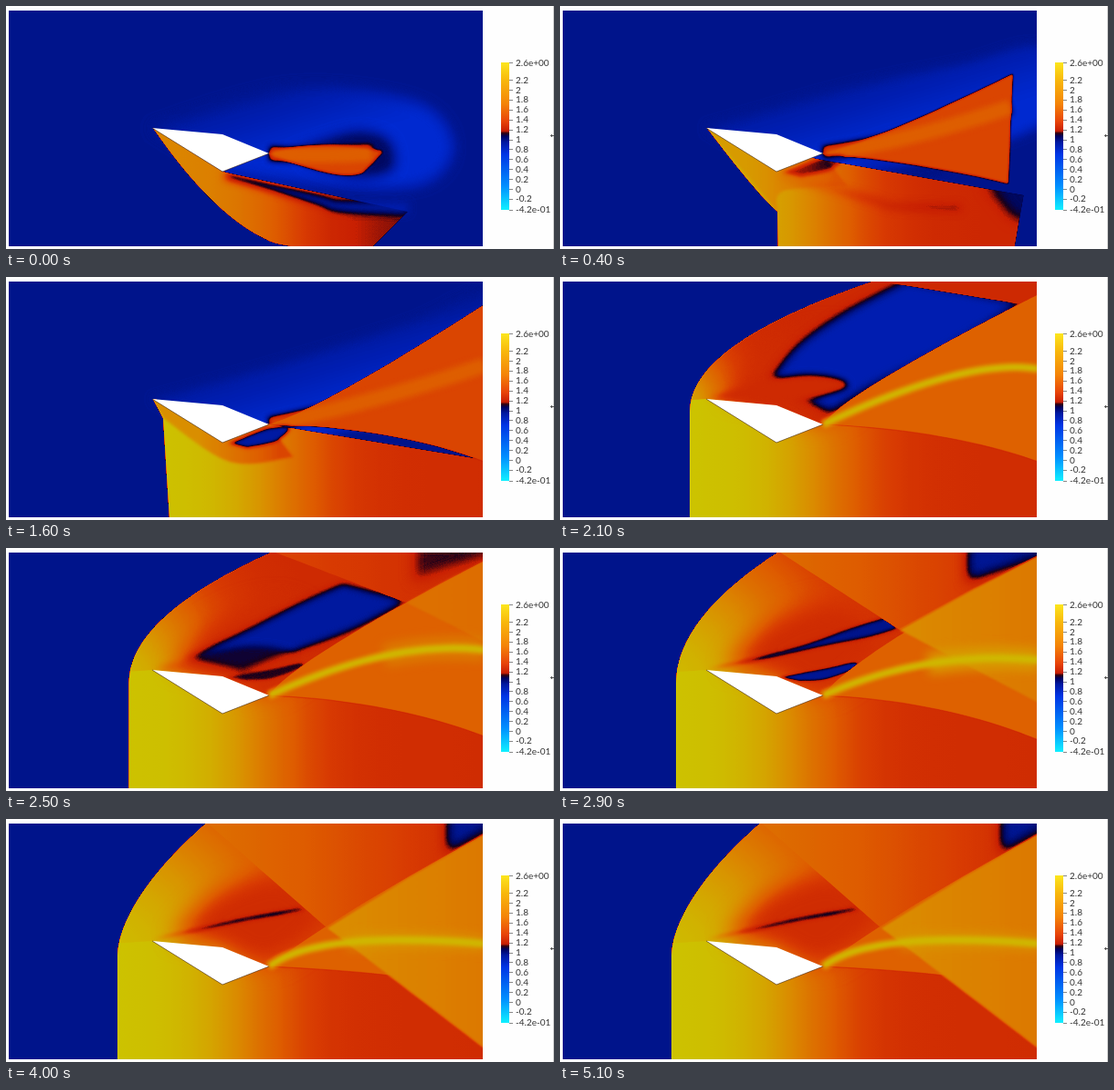
An HTML page with a canvas for the animation above (5200 ms loop, 600 px wide and 267 px high).

```html
<!DOCTYPE html>
<html lang="en">
<head>
<meta charset="utf-8">
<title>Supersonic flow around a wedge</title>
<style>
  html, body { margin: 0; width: 100%; height: 100%; overflow: hidden; background: #fefefe; }
  canvas { display: block; }
</style>
</head>
<body>
<canvas id="stage" width="600" height="267"></canvas>
<script>
const stage = document.getElementById('stage').getContext('2d');
const fieldCanvas = document.createElement('canvas');
fieldCanvas.width = 600;
fieldCanvas.height = 267;
const field = fieldCanvas.getContext('2d', { willReadFrequently: true });

const LOOP = 5200, STEP = 100;
const DOMAIN = [3, 5, 519, 259], RIGHT = 524;
const NOSE = [160, 134], ROOF = [237, 141], TAIL = [288, 162], KEEL = [237, 182];

// Key poses of the flow.
// bow: stem x, bend y, width and height of the part above the bend, its power, foot x
// roof, floor, jet: control and end point of the curves that leave the tail
// cross: where the reflected shock meets the roof, and its height at the outlet
// heat, glow: how far the hot gas reaches below and above the wedge
const POCKET = [232, 112, 262, 75, 312, 40, 380, 4], POCKET_BACK = [505, 28, 425, 78, 345, 118, 296, 148];
const POSES = [
  { t: 0, bow: [322, 266, -161, 132, .56, 322], roof: [340, 146, 412, 160], floor: [365, 194, 390, 183],
    jet: [340, 166, 400, 162], cross: [505, 30, 36], heat: 300, glow: 60, pocket: POCKET, pocketBack: POCKET_BACK },
  { t: 800, bow: [210, 212, -49, 78, 1, 211], roof: [345, 150, RIGHT, 46], floor: [425, 168, RIGHT, 199],
    jet: [400, 142, RIGHT, 94], cross: [505, 30, 36], heat: 290, glow: 60, pocket: POCKET, pocketBack: POCKET_BACK },
  { t: 1600, bow: [172, 155, -11, 21, 1, 179], roof: [345, 145, RIGHT, 30], floor: [425, 165, RIGHT, 203],
    jet: [400, 139, RIGHT, 97], cross: [505, 30, 36], heat: 300, glow: 60, pocket: POCKET, pocketBack: POCKET_BACK },
  { t: 2100, bow: [142, 150, 203, 146, 2.1, 142], roof: [310, 128, RIGHT, 19], floor: [425, 168, RIGHT, 203],
    jet: [445, 88, RIGHT, 101], cross: [505, 30, 36], heat: 290, glow: 60, pocket: POCKET, pocketBack: POCKET_BACK },
  { t: 2900, bow: [127, 150, 113, 146, 2, 127], roof: [320, 118, RIGHT, 9], floor: [420, 168, RIGHT, 211],
    jet: [400, 112, RIGHT, 123], cross: [372, 90, 170], heat: 265, glow: 130,
    pocket: [162, 133, 260, 109, 320, 88, 358, 76], pocketBack: [370, 88, 340, 97, 290, 107, 220, 123] },
  { t: 4000, bow: [122, 150, 98, 146, 1.7, 122], roof: [350, 112, RIGHT, 17], floor: [420, 168, RIGHT, 186],
    jet: [340, 122, RIGHT, 137], cross: [352, 120, 252], heat: 265, glow: 150,
    pocket: [161, 132, 220, 118, 270, 107, 322, 98], pocketBack: [328, 99, 300, 105, 265, 111, 215, 122] }];

const clamp = x => Math.max(0, Math.min(1, x));

function mix(a, b, f) {
  if (typeof a === 'number') return a + (b - a) * f;
  if (Array.isArray(a)) return a.map((x, i) => mix(x, b[i], f));
  return Object.fromEntries(Object.keys(a).map(k => [k, mix(a[k], b[k], f)]));
}

let phase, flow;

function setTime(ms) {
  const next = POSES.findIndex(p => p.t > ms);
  if (next < 0) {
    phase = POSES.length - 1;
    flow = POSES[phase];
    return;
  }
  const [a, b] = [POSES[next - 1], POSES[next]];
  const u = (ms - a.t) / (b.t - a.t);
  const f = next === 1 || next === 5 ? 1 - (1 - u) ** 2 : u;
  phase = next - 1 + f;
  flow = mix(a, b, f);
}
const ramp = (from, to) => clamp((phase - from) / (to - from));
const peak = k => clamp(1 - Math.abs(phase - k));

// The field is painted in grey levels, then coloured through this map.
const COLOURS = [
  [0.4, 0, 90, 235], [0.8, 0, 42, 210], [0.93, 0, 28, 172], [1, 0, 20, 139], [1.07, 0, 6, 90],
  [1.12, 25, 0, 25], [1.16, 130, 15, 8], [1.2, 200, 32, 2], [1.35, 216, 58, 2], [1.5, 222, 92, 0],
  [1.8, 219, 135, 0], [2, 212, 165, 0], [2.2, 204, 196, 0], [2.6, 235, 220, 0]];
const LOW = 0.4, SCALE = 120;
const palette = Array.from({ length: 256 }, (_, g) => {
  const v = LOW + g / SCALE;
  const k = Math.max(1, COLOURS.findIndex(c => c[0] >= v));
  const [a, b] = [COLOURS[k - 1], COLOURS[k]];
  return mix(a, b, (v - a[0]) / (b[0] - a[0])).slice(1);
});
const grey = v => {
  const g = (v - LOW) * SCALE;
  return `rgb(${g},${g},${g})`;
};

// Gradient of value(u) for u from 0 to 1.
function shade(gradient, value) {
  for (let i = 0; i <= 16; i++) gradient.addColorStop(i / 16, grey(value(i / 16)));
  return gradient;
}
const linear = (x0, y0, x1, y1, value) => shade(field.createLinearGradient(x0, y0, x1, y1), value);
const across = (x0, x1, from, to) => linear(x0, 0, x1, 0, u => mix(from, to, u));
const cooling = (hot, cold, reach, width) => d => cold + (hot - cold) / (1 + Math.exp((d - reach) / width));

// Joins smooth curves, each a flat list x, y, x, y ...
function trace(curves) {
  field.beginPath();
  curves.forEach((c, n) => {
    const last = c.length / 2 - 1;
    const p = i => { const j = 2 * Math.max(0, Math.min(last, i)); return [c[j], c[j + 1]]; };
    n ? field.lineTo(...p(0)) : field.moveTo(...p(0));
    for (let i = 0; i < last; i++) {
      const [a, b, d, e] = [p(i - 1), p(i), p(i + 1), p(i + 2)];
      field.bezierCurveTo(b[0] + (d[0] - a[0]) / 6, b[1] + (d[1] - a[1]) / 6,
        d[0] - (e[0] - b[0]) / 6, d[1] - (e[1] - b[1]) / 6, ...d);
    }
  });
}

function layer(paint, curves, { alpha = 1, blur = 0, width = 0 } = {}) {
  if (alpha <= 0) return;
  const fill = typeof paint === 'number' ? grey(paint) : paint;
  field.globalAlpha = alpha;
  field.filter = blur ? `blur(${blur}px)` : 'none';
  field.fillStyle = field.strokeStyle = fill;
  field.lineWidth = width || 1;
  trace(curves);
  width ? field.stroke() : field.fill();
  field.filter = 'none';
  field.globalAlpha = 1;
}

// Quadratic curve from the tail, sampled between two fractions.
function fromTail([cx, cy, x, y], from = 0, to = 1) {
  const points = [];
  for (let i = 0; i <= 10; i++) {
    const u = from + (to - from) * i / 10, v = 1 - u;
    points.push(v * v * TAIL[0] + 2 * u * v * cx + u * u * x, v * v * TAIL[1] + 2 * u * v * cy + u * u * y);
  }
  return points;
}

function bowCurve() {
  const [stem, bend, width, height, power] = flow.bow;
  const points = [];
  for (let i = 24; i >= 0; i--) points.push(stem + width * (i / 24) ** power, bend - height * i / 24);
  return points;
}

function paintUpstream() {
  field.fillStyle = grey(1);
  field.fillRect(0, 0, 600, 267);
  const start = peak(0);
  const fan = mix(
    [...NOSE, 310, 91, 440, 50, 540, 12, 560, 100, 385, 165, ...KEEL],
    [...NOSE, 310, 91, 445, 105, 488, 150, 462, 192, 385, 198, ...KEEL], start);
  layer(linear(330, 70, 353, 147, u => 1 - .19 * u), [fan], { blur: 5 + 2 * start });
  layer(1.06, [[315, 157, 380, 136, 420, 146, 425, 180, 385, 190, 330, 175]], { alpha: start, blur: 6 });
}

function paintBelow(bow) {
  const start = peak(0);
  const value = cooling(2.2 - .4 * start, 1.27 - .12 * start, flow.heat, 32);
  layer(linear(120, 0, 540, 0, u => value(120 + 420 * u)), bow, { blur: .6 });
  layer(.92, [[240, 186, 290, 199, 345, 214, 365, 220, 440, 222]], { alpha: start, blur: 4, width: 9 });
  const [stem, bend] = flow.bow;
  field.save();
  trace(bow);
  field.clip();
  layer(across(210, 300, 1.85, 1.4), [[...NOSE, ...TAIL], [315, 198, 245, 203, stem, bend]],
    { alpha: ramp(.3, 1) * (1 - ramp(2, 3)), blur: 1.5 });
  layer(1, [[465, 195, 524, 190, 540, 240, 495, 232]], { alpha: peak(1), blur: 8 });
  field.restore();
}

function paintAbove(bow, bowTop) {
  field.save();
  trace(bow);
  field.clip();
  const value = cooling(2.2, 1.25, flow.glow, flow.glow / 3);
  const glow = shade(field.createRadialGradient(110, 150, 0, 110, 150, 260), u => value(260 * u));
  layer(glow, [[100, 138, ...NOSE], [...ROOF, ...TAIL], [540, 161, 540, 0], [100, 0, 100, 138]]);
  layer(1.27, [[182, 129, 230, 80, 305, 60, 350, 108, 290, 160, ...ROOF]], { blur: 12 });

  // Cold pocket that shrinks to a sliver behind the nose.
  const shrunk = ramp(3, 4);
  layer(mix(.92, 1, shrunk), [flow.pocket, flow.pocketBack], { alpha: ramp(2, 3), blur: 6 - 4 * shrunk });
  layer(1.26, [[163, 133, 210, 117, 265, 107, 305, 111, 315, 121, 285, 132, ...ROOF]],
    { alpha: peak(3), blur: 3.5 });
  layer(.98, [[240, 142, 290, 133, 322, 126, 323, 132, 290, 144, 262, 146]], { alpha: peak(4), blur: 1.8 });

  // Shock reflected from the upper wall.
  const [x, y] = flow.cross;
  layer(across(230, 520, 1.25 + .37 * shrunk, 1.25), [[...bowTop, x, y], [RIGHT, flow.roof[3], RIGHT, 0]],
    { alpha: ramp(2.6, 3), blur: .7 });
  const corner = mix(445, 482, ramp(4, 5));
  layer(.98, [[corner, -5, 540, -5], [540, 4, corner, 38]], { alpha: shrunk, blur: 7 });
  field.restore();
}

function paintWake() {
  const { roof, floor, jet, cross: [x, y, exit] } = flow;
  const late = ramp(2, 3), fan = ramp(3, 4);
  layer(1.4 + .13 * late, [fromTail(roof), fromTail(floor).slice(-2), fromTail(floor, 1, 0)],
    { blur: .7 + 1.1 * peak(0) });
  layer(1.2, [fromTail(floor)], { alpha: .5, blur: .5, width: 1.2 });

  // Amber fan downstream of the shock crossing.
  layer(across(350, 522, 1.85, 1.7), [[x, y, RIGHT, exit], [RIGHT, roof[3], mix(x, RIGHT, .5), mix(y, roof[3], .52)]],
    { alpha: fan, blur: .8 });
  layer(1.97, [fromTail(jet, .5)], { alpha: fan * (.9 - .3 * ramp(4, 5)), blur: 6, width: 24 - 8 * ramp(4, 5) });
  layer(1.55 + .57 * late, [fromTail(jet)], { alpha: .8 + .2 * late, blur: 3 - late, width: 16 - 8 * late });

  // Low-pressure pocket under the tail.
  layer(.95, [[243, 183, 287, 166, 311, 165, 297, 180, 264, 188]],
    { alpha: ramp(.2, 1) * (1 - ramp(2, 3)), blur: 2 });
}

function polygon(points) {
  stage.beginPath();
  points.forEach(p => stage.lineTo(...p));
}

function paintBody() {
  stage.fillStyle = '#fff';
  polygon([NOSE, ROOF, TAIL, KEEL]);
  stage.fill();
  stage.strokeStyle = 'rgba(50,20,0,.7)';
  stage.lineWidth = .8;
  polygon([NOSE, KEEL, TAIL]);
  stage.stroke();
}

function paintLegend() {
  const bar = stage.createLinearGradient(0, 62, 0, 224);
  [[0, '#fce61e'], [.12, '#f8b80c'], [.28, '#f48408'], [.4, '#e8440a'], [.465, '#c81e04'], [.48, '#300010'],
    [.5, '#00005c'], [.54, '#0018a0'], [.62, '#0034e4'], [.84, '#0090ff'], [1, '#10f0ff']]
    .forEach(s => bar.addColorStop(...s));
  stage.fillStyle = bar;
  stage.fillRect(542, 62, 9, 162);

  stage.font = '10px Lato, sans-serif';
  stage.textBaseline = 'middle';
  const label = (text, y) => {
    stage.fillStyle = '#888';
    stage.fillRect(551, Math.round(y), 4, 1);
    stage.fillStyle = '#333';
    stage.fillText(text, 558, y + .5);
  };
  label('2.6e+00', 62);
  for (let n = 11; n >= -1; n--) label(String(n / 5), 201 - n * 10.9);
  label('-4.2e-01', 223.5);

  stage.fillStyle = '#ccc';
  stage.fillRect(599, 0, 1, 267);
  stage.fillStyle = '#555';
  stage.fillRect(596, 142, 4, 1);
  stage.fillRect(597, 141, 1, 3);
}

function paintFlow(ms) {
  setTime(ms);
  const curve = bowCurve();
  const outlet = mix(
    mix([530, 266, 530, 202, ...TAIL], [530, 266, 530, 2, 400, 2], ramp(2, 3)),
    [400, 266, 440, 226, ...KEEL], peak(0));
  const bow = [curve, [flow.bow[5], 266, outlet[0], outlet[1]], outlet.slice(2, 4), outlet.slice(4)];
  paintUpstream();
  paintBelow(bow);
  if (phase > 2) paintAbove(bow, curve.slice(0, 2));
  paintWake();

  const image = field.getImageData(...DOMAIN), px = image.data;
  for (let i = 0; i < px.length; i += 4) [px[i], px[i + 1], px[i + 2]] = palette[px[i]];
  stage.putImageData(image, DOMAIN[0], DOMAIN[1]);
  paintBody();
}

let shown = -1;
function tick() {
  const step = Math.floor(performance.now() % LOOP / STEP);
  if (step !== shown) paintFlow((shown = step) * STEP);
  requestAnimationFrame(tick);
}
paintLegend();
tick();
</script>
</body>
</html>
```
